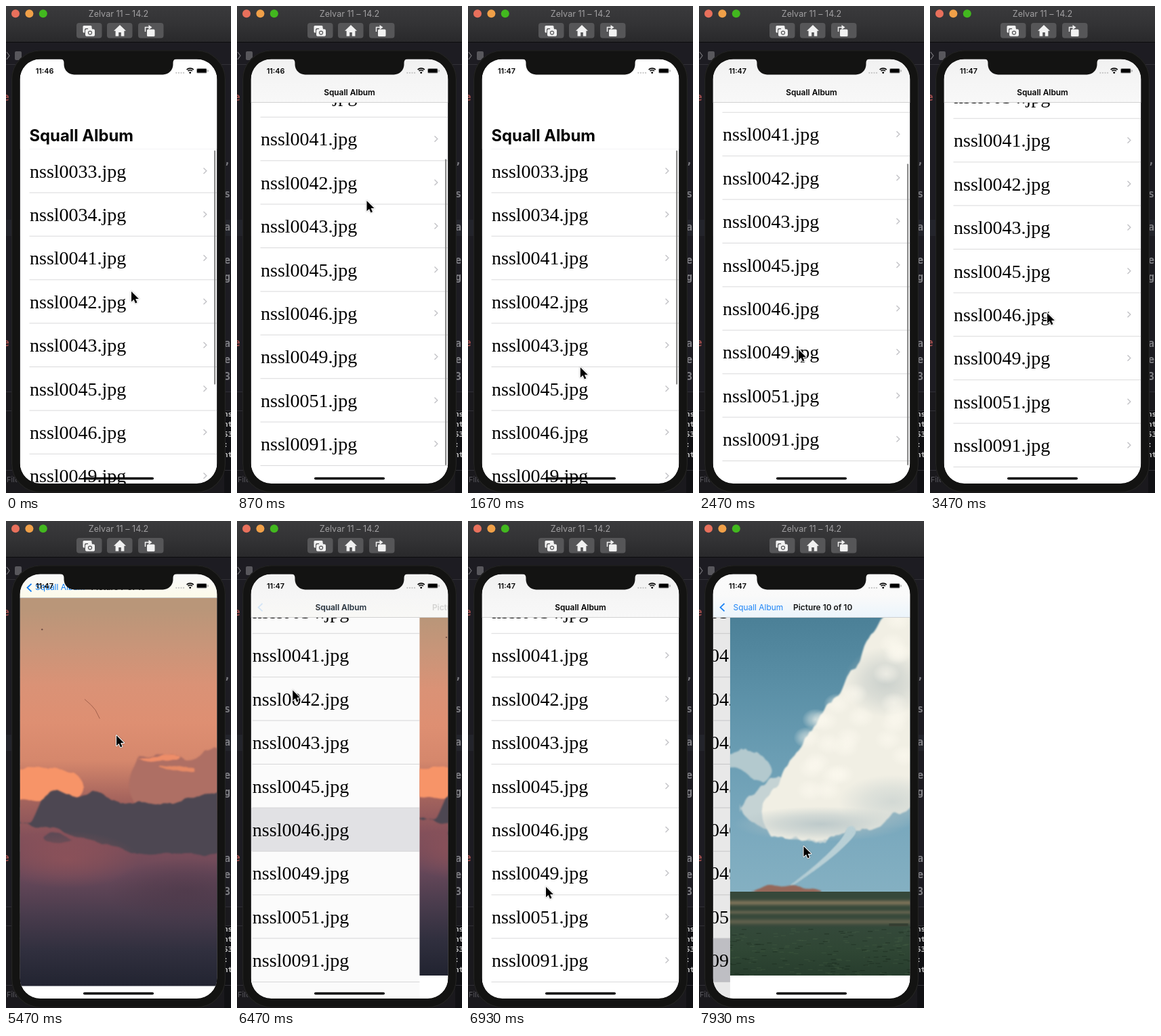
These frames come from a looping animation (332 by 720 pixels, 8000 ms). An HTML page with a canvas:

```html
<!DOCTYPE html>
<html lang="en">
<head>
<meta charset="utf-8">
<title>Simulator</title>
<style>
html, body { margin: 0; width: 100%; height: 100%; overflow: hidden; background: #1c1b21; }
canvas { display: block; width: 332px; height: 720px; }
</style>
</head>
<body>
<canvas id="stage" width="332" height="720"></canvas>
<script>
const ctx = document.getElementById('stage').getContext('2d');
const LOOP = 8000, FPS = 15;
const APP = 'Squall Album', DEVICE = 'Zelvar 11 – 14.2';
const SANS = 'Inter, sans-serif', SERIF = '"Liberation Serif", serif', MONO = '"DejaVu Sans Mono", monospace';
const BLUE = '#0a7af5', SHELL = '#131312', WHITE = '#f1f1f1';
const LEFT = 20.5, TOP = 78.5, WIDTH = 291, BOTTOM = 706, CENTER = 166;
const BAR = 143, LARGE_BAR = 211.5, ROW = 64.4, REST = 174;
const FILES = ['0033', '0034', '0041', '0042', '0043', '0045', '0046', '0049', '0051', '0091'];
const PUSH_FIRST = 3643, POP = 6270, PUSH_SECOND = 7700;

// Pointer stops: time, x, y.
const POINTER = [[60, 185, 422], [420, 191.5, 288], [1130, 191.5, 288], [1870, 160, 590], [2330, 147, 508],
  [2870, 147, 508], [3470, 173, 454], [4000, 174, 453], [5000, 163, 317], [5600, 163, 317], [6200, 68, 124],
  [6930, 115, 541], [7467, 126, 645], [7680, 126, 645], [7933, 154.5, 481]];

const clamp = v => Math.min(1, Math.max(0, v));
const mix = (a, b, u) => a + (b - a) * u;
const bump = (x, center, width) => Math.exp(-(((x - center) / width) ** 2));

// Eased step from 0 to 1 between two times or places.
function ramp(v, start, end) {
  const u = clamp((v - start) / (end - start));
  return u * u * (3 - 2 * u);
}

// Remaining distance of a critically damped spring.
function spring(ms) {
  const x = Math.max(0, ms) / 57.5;
  return (1 + x) * Math.exp(-x);
}

function random(n) {
  const v = Math.sin(n * 127.1 + 11.7) * 43758.5453;
  return v - Math.floor(v);
}

// Fractal noise around zero for ragged edges.
function ragged(x, seed) {
  let sum = 0;
  for (let size = 26, weight = 1; size > 2; size /= 2, weight /= 1.8) {
    const i = Math.floor(x / size);
    sum += weight * (mix(random(i + seed), random(i + 1 + seed), ramp(x / size, i, i + 1)) - .5);
  }
  return sum;
}

function text(str, x, y, font, color, align = 'left') {
  ctx.font = font;
  ctx.fillStyle = color;
  ctx.textAlign = align;
  ctx.fillText(str, x, y);
}

function rect(x, y, w, h, color, r = 0) {
  ctx.fillStyle = color;
  ctx.beginPath();
  ctx.roundRect(x, y, w, h, r);
  ctx.fill();
}

function line(points, color, width) {
  ctx.strokeStyle = color;
  ctx.lineWidth = width;
  ctx.beginPath();
  points.forEach(p => ctx.lineTo(...p));
  ctx.stroke();
}

function polygon(points, color) {
  ctx.fillStyle = color;
  ctx.beginPath();
  points.forEach(p => ctx.lineTo(...p));
  ctx.fill();
}

function disc(x, y, r, color) {
  ctx.fillStyle = color;
  ctx.beginPath();
  ctx.arc(x, y, r, 0, 7);
  ctx.fill();
}

function gradient(y0, y1, ...colors) {
  const g = ctx.createLinearGradient(0, y0, 0, y1);
  colors.forEach((color, i) => g.addColorStop(i / (colors.length - 1), color));
  return g;
}

function glow(x, y, rx, ry, rgb, alpha) {
  ctx.save();
  ctx.translate(x, y);
  ctx.scale(rx, ry);
  const g = ctx.createRadialGradient(0, 0, 0, 0, 0, 1);
  g.addColorStop(0, `rgba(${rgb},${alpha})`);
  g.addColorStop(.5, `rgba(${rgb},${alpha * .6})`);
  g.addColorStop(1, `rgba(${rgb},0)`);
  disc(0, 0, 1, g);
  ctx.restore();
}

// Ragged cloud between two height curves, rounded off at both ends.
function cloud(color, x0, x1, top, bottom, rough, seed) {
  const upper = [], lower = [];
  for (let x = x0; x <= x1; x += 1.5) {
    const squeeze = Math.sqrt(clamp(Math.min(x - x0, x1 - x) / 14));
    const a = top(x), b = bottom(x), middle = (a + b) / 2;
    upper.push([x, mix(middle, a, squeeze) + rough * ragged(x, seed)]);
    lower.unshift([x, mix(middle, b, squeeze) + rough * .6 * ragged(x, seed + 50)]);
  }
  ctx.filter = 'blur(1px)';
  polygon([...upper, ...lower], color);
  ctx.filter = 'none';
}

function sunset() {
  rect(0, 80, 332, 640, gradient(143, 672, '#b99679', '#c99579', '#da9276', '#de8f72', '#d5876c', '#a5645d',
    '#84505a', '#68485a', '#4a3c4d', '#302f3e', '#212330'));
  cloud('#f79468', -20, 118, x => 363 + 5 * ramp(x, 60, 110), () => 410, 7, 3);
  cloud('#ae6f64', 180, 345, x => 350 - 8 * ramp(x, 250, 300), () => 425, 12, 8);
  cloud('#ee8d68', 194, 252, () => 348, () => 354, 6, 21);
  cloud('#e58965', 222, 272, x => 360 + (x - 222) / 8, x => 364 + (x - 222) / 8, 5, 33);
  cloud('#4d4752', -20, 350,
    x => 437 - 25 * ramp(x, 44, 62) - 22 * bump(x, 78, 20) - 19 * bump(x, 132, 21) - 13 * bump(x, 311, 55),
    x => 442 + 43 * ramp(x, 25, 215), 9, 5);
  cloud('#5a4955', 62, 101, x => 454 + (x - 62) / 7, () => 470, 5, 14);
  glow(95, 492, 100, 40, '166,88,88', .45);
  glow(260, 535, 110, 45, '70,52,68', .5);
  line([[119, 269], [128, 277], [134, 284], [140, 296]], '#a0604c', .9);
  disc(60, 172, 1.1, '#6d4a42');
}

function twister() {
  ctx.save();
  ctx.translate(-25, 0);
  rect(20, 80, 340, 480, gradient(143, 548, '#4b8097', '#5a8fa6', '#6a9db3', '#79a8bd', '#84b0c2'));
  cloud('#b3c9ce', 20, 108, x => 345 - 12 * bump(x, 72, 25), x => 368 + 22 * ramp(x, 60, 100), 14, 4);
  cloud('#c5d3d4', 60, 200, x => 402 - 30 * ramp(x, 70, 120), x => 445 + 30 * ramp(x, 70, 140), 16, 9);
  cloud('#f1efe4', 92, 370, x => 385 - 1.5 * Math.max(0, x - 112), x => 474 - 45 * ((x - 145) / 165) ** 2, 22, 6);
  glow(275, 238, 62, 52, '190,198,196', .75);
  glow(180, 448, 130, 26, '176,192,196', .8);
  glow(285, 415, 80, 40, '190,202,202', .6);
  for (let i = 0; i < 26; i++) {
    const along = random(i + 200), x = mix(150, 320, along);
    glow(x, mix(400, 372 - 1.35 * (x - 112), random(i + 300)), 20, 16, '253,250,240', .6);
  }
  ctx.filter = 'blur(1px)';
  for (let u = 0; u <= 1; u += .02) disc(224 - 90 * u ** 1.3, 458 + 82 * u, mix(7, 1.5, u ** .6), '#b9d0d6');
  ctx.filter = 'none';
  cloud('#95685a', 78, 180, x => 544 - 5 * bump(x, 105, 14) - 5 * bump(x, 138, 16), () => 551, 3, 12);
  for (let y = 548; y < 602; y++) {
    const soil = clamp(bump(y, 564, 4) + bump(y, 578, 3) * .6 + bump(y, 592, 4) * .6);
    rect(20, y, 340, 1.5, `rgb(${mix(54, 118, soil)},${mix(72, 110, soil)},${mix(58, 86, soil)})`);
  }
  rect(20, 600, 340, 80, gradient(600, 672, '#34493a', '#2f4634', '#273d2d'));
  for (let i = 0; i < 260; i++) {
    const shade = random(i + 900) < .5 ? 'rgba(18,34,22,.35)' : 'rgba(84,108,78,.22)';
    rect(mix(20, 345, random(i + 400)), mix(602, 671, random(i + 1300)), 7, 1.3, shade);
  }
  rect(280, 595, 28, 4, '#353e32');
  ctx.restore();
}

function list(scroll, shift, selected, selection, barBottom, indicator) {
  ctx.save();
  ctx.beginPath();
  ctx.rect(LEFT, barBottom, WIDTH, BOTTOM - barBottom);
  ctx.clip();
  ctx.translate(shift, 0);
  for (let i = 0; i <= FILES.length; i++) {
    const y = LARGE_BAR + ROW * i - scroll;
    if (i < FILES.length) {
      if (i === selected) rect(LEFT, y, WIDTH, ROW, `rgba(209,209,214,${selection})`);
      text(`nssl${FILES[i]}.jpg`, 35, y + 42, '28px ' + SERIF, '#000');
      line([[291.5, y + 28], [295.8, y + 32.2], [291.5, y + 36.4]], '#c3c3c7', 1.4);
    }
    rect(34.5, y - .5, 277, 1, '#dadadb');
  }
  ctx.restore();
  const view = 680 - barBottom;
  const length = view * view / 634 - Math.max(0, scroll - REST);
  const top = barBottom + 2 + clamp(scroll / REST) * (view - length - 3);
  rect(307, top, 2.2, length, `rgba(120,120,120,${.85 * indicator})`, 1.1);
}

function picture(paint, offset, hide) {
  const top = BAR - 64 * hide, bottom = 672 + 34 * hide, scale = 1 + .14 * hide;
  rect(LEFT + offset, TOP, WIDTH, BOTTOM - TOP, '#fff');
  ctx.save();
  ctx.beginPath();
  ctx.rect(LEFT + offset, top, WIDTH, bottom - top);
  ctx.clip();
  ctx.translate(CENTER + offset, 355);
  ctx.scale(scale, scale);
  ctx.translate(-CENTER, -355);
  paint();
  ctx.restore();
}

function navigationBar(scroll, progress, hide, barBottom, heading, tint) {
  const collapsed = clamp((scroll - 45) / 24), slide = 87 * (1 - progress);
  const bold = '600 11.9px ' + SANS;
  ctx.save();
  ctx.translate(0, -64 * hide);
  rect(LEFT, TOP, WIDTH, barBottom - TOP, '#fff');
  if (scroll < 75) text(APP, 34.5, 200 - scroll, '700 23.8px ' + SANS, '#000');

  ctx.globalAlpha = collapsed;
  rect(LEFT, TOP, WIDTH, BAR - TOP, gradient(TOP, BAR, '#f1f1f1', '#f5f5f5', '#f8f8f8'));
  ctx.globalAlpha = progress;
  rect(LEFT, TOP, WIDTH, BAR - TOP, gradient(TOP, BAR, '#fcfcfc', '#fafafa', tint));
  ctx.globalAlpha = collapsed;
  rect(LEFT, BAR - .8, WIDTH, .8, '#c4c4c4');

  ctx.globalAlpha = collapsed * clamp(1 - progress * 1.3);
  text(APP, 79 + slide, 131.5, bold, '#000', 'center');
  ctx.globalAlpha = progress;
  text(APP, 43 + slide, 131.5, '11.9px ' + SANS, BLUE);
  line([[37.5, 122], [31.5, 127.7], [37.5, 133.4]], BLUE, 1.8);
  text(heading, CENTER + (1 - progress) * 190, 131.5, bold, '#000', 'center');
  ctx.restore();
}

function statusBar(t) {
  text(t < 1500 ? '11:46' : '11:47', 57, 100, '600 10.8px ' + SANS, '#000', 'center');
  for (let i = 0; i < 4; i++) disc(251.3 + i * 3.6, 98.8, 1.1, '#c2c2c2');
  ctx.strokeStyle = '#000';
  ctx.lineWidth = 1.7;
  for (const r of [7.2, 4.4]) {
    ctx.beginPath();
    ctx.arc(271.7, 99.3, r, -2.35, -.79);
    ctx.stroke();
  }
  disc(271.7, 98.6, 1.4, '#000');
  rect(281, 92, 15.6, 7.6, '#999', 2.2);
  rect(282, 93, 13.6, 5.6, '#000', 1.2);
  rect(297.6, 94.6, 1, 2.6, '#888');
}

function desktop() {
  rect(0, 0, 332, 720, '#1d1c22');
  rect(0, 316, 332, 24, '#23242b');
  rect(0, 570, 332, 150, '#1a191d');
  rect(322, 598, 10, 122, '#111114');
  [86, 570, 598, 686].forEach(y => rect(0, y, 332, 1, '#313036'));
  line([[1, 68], [5, 73.5], [1, 79]], '#77767b', 1.2);
  rect(13, 67, 10, 13, '#58575c', 2);
  [140, 503].forEach(y => text('e:', -5, y, 'bold 16px ' + MONO, '#9a4a4a'));
  [...', s a eg   ae3'].forEach((s, i) => text(s, 322, 234 + i * 24.5, 'bold 15px ' + MONO, '#7d7d82'));
  ['ns', 'nt', '53', ':', 'nt'].forEach((s, i) => text(s, 321, 607 + i * 15, 'bold 11px ' + MONO, '#c4c4c4'));
  text('Filter', 1, 704, '11px ' + SANS, '#5c5b60');
}

function titleBar() {
  const button = '#565658';
  rect(0, 0, 332, 53, gradient(0, 53, '#3a3a3c', '#333335', '#29292b'));
  rect(0, 53, 332, 1, '#0c0c0e');
  ['#e8705c', '#f0a048', '#42b81f'].forEach((color, i) => disc(14 + i * 20.4, 11.3, 6, color));
  text(DEVICE, CENTER, 16, '12.6px ' + SANS, '#a09fa1', 'center');
  [104, 149, 195].forEach(x => rect(x, 25, 37.5, 22.5, button, 4));
  rect(113.5, 29, 13, 10.5, WHITE, 1.5);
  rect(116, 33, 16, 13, button, 2);
  rect(117, 34.2, 14, 10.6, WHITE, 2);
  rect(121, 32.6, 6, 3, WHITE, 1);
  disc(124, 39.6, 3.1, button);
  disc(124, 39.6, 1.9, WHITE);
  polygon([[168, 28], [177, 36.8], [159, 36.8]], WHITE);
  rect(161.6, 36, 12.8, 8.6, WHITE);
  rect(166.2, 39, 3.6, 6, button);
  rect(208, 34.5, 11.5, 10.5, WHITE, 1.5);
  line([[205.5, 38], [205.5, 31.5], [211, 31.5]], WHITE, 1.5);
  polygon([[210.5, 28], [215.5, 31.5], [210.5, 35]], WHITE);
}

function bezel() {
  ctx.fillStyle = SHELL;
  ctx.beginPath();
  ctx.roundRect(8, 65.5, 316, 654, 43);
  ctx.roundRect(LEFT, TOP, WIDTH, BOTTOM - TOP, 30);
  ctx.fill('evenodd');
  ctx.strokeStyle = '#242423';
  ctx.lineWidth = 1.2;
  ctx.beginPath();
  ctx.roundRect(8.6, 66, 314.8, 653, 42.5);
  ctx.stroke();
  ctx.fillStyle = SHELL;
  ctx.beginPath();
  ctx.moveTo(80, 78);
  ctx.quadraticCurveTo(85.5, 78.5, 85.5, 84);
  ctx.arcTo(85.5, 101.5, 102, 101.5, 15);
  ctx.arcTo(246.5, 101.5, 246.5, 84, 15);
  ctx.lineTo(246.5, 84);
  ctx.quadraticCurveTo(246.5, 78.5, 252, 78);
  ctx.fill();
}

function pointer(t) {
  const next = POINTER.findIndex(stop => stop[0] > t);
  const b = POINTER.at(next), a = next > 0 ? POINTER[next - 1] : b;
  const u = ramp(t, a[0], b[0] + 1e-6);
  const shape = new Path2D('M0 0V15.2L3.6 11.9L6 17.4L8.5 16.3L6.1 11H11Z');
  ctx.save();
  ctx.translate(mix(a[1], b[1], u), mix(a[2], b[2], u));
  ctx.lineJoin = 'round';
  ctx.lineWidth = 2;
  ctx.strokeStyle = '#fff';
  ctx.shadowColor = 'rgba(0,0,0,.35)';
  ctx.shadowBlur = 2;
  ctx.stroke(shape);
  ctx.shadowColor = 'transparent';
  ctx.fillStyle = '#000';
  ctx.fill(shape);
  ctx.restore();
}

function draw(t) {
  const scroll = 176 * ramp(t, 60, 800) - 176 * ramp(t, 1130, 1600) + 183 * ramp(t, 1870, 2400) - 9 * ramp(t, 2470, 2600);
  const hide = ramp(t, 4430, 4650) - ramp(t, 5350, 5570);
  const second = t >= PUSH_SECOND;
  const pushed = second ? 1 - spring(t - PUSH_SECOND) : t < POP ? 1 - spring(t - PUSH_FIRST) : spring(t - POP);
  const progress = pushed < .001 ? 0 : pushed;
  const barBottom = Math.max(BAR, LARGE_BAR - scroll);
  const selection = second ? 1 : t < 3530 ? 0 : 1 - clamp((t - POP) / 450);

  desktop();
  ctx.save();
  ctx.beginPath();
  ctx.roundRect(LEFT, TOP, WIDTH, BOTTOM - TOP, 30);
  ctx.clip();
  rect(LEFT, TOP, WIDTH, BOTTOM - TOP, '#fff');
  list(scroll, -84 * progress, second ? 9 : 6, selection, barBottom, 1 - ramp(t, 2870, 3200));
  rect(LEFT, TOP, WIDTH, BOTTOM - TOP, `rgba(0,0,0,${.1 * progress})`);
  if (progress) picture(second ? twister : sunset, WIDTH * (1 - progress), hide);
  navigationBar(scroll, progress, hide, barBottom, `Picture ${second ? 10 : 7} of 10`, second ? '#eaf4fc' : '#fcfae9');
  statusBar(t);
  rect(114, 696.8, 104, 3.4, '#000', 1.7);
  ctx.restore();
  bezel();
  titleBar();
  pointer(t);
}

function tick(now) {
  const step = Math.floor(((now % LOOP) + 4) * FPS / 1000) % (LOOP * FPS / 1000);
  draw(step * 1000 / FPS);
  requestAnimationFrame(tick);
}
requestAnimationFrame(tick);
</script>
</body>
</html>
```
